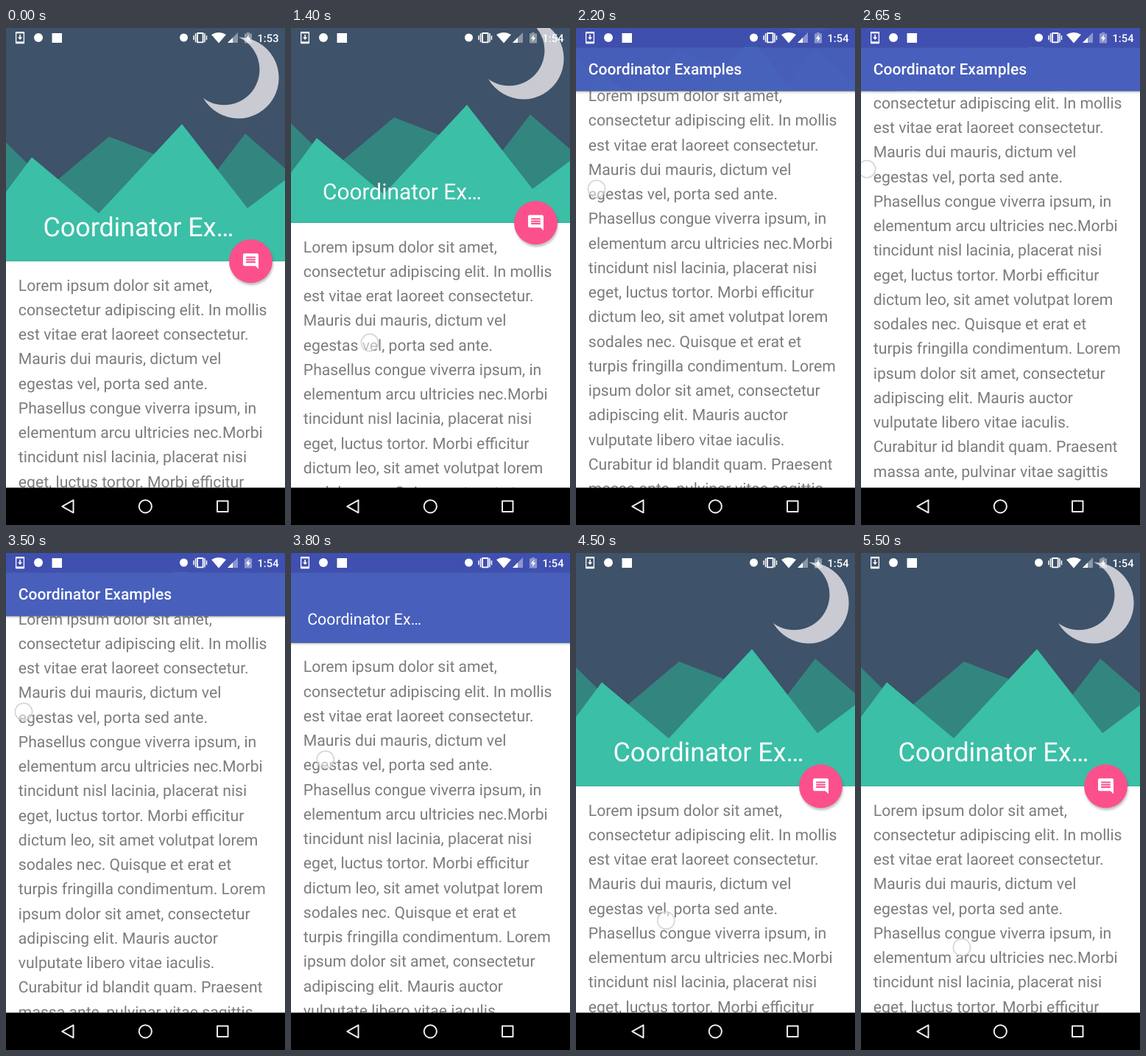
These frames come from a looping animation (379 by 673 pixels, 5.65 s). An HTML page with a canvas:

```html
<!DOCTYPE html>
<html lang="en">
<head>
<meta charset="utf-8">
<title>Collapsing toolbar</title>
<style>
  html, body { margin: 0; width: 100%; height: 100%; overflow: hidden; background: #000; }
  canvas { display: block; width: 379px; height: 673px; }
</style>
</head>
<body>
<canvas id="stage"></canvas>
<script>
const W = 379, H = 673, LOOP = 5650, STEP = 50, DP = W / 360;
const EXPANDED = 300 * DP, COLLAPSED = 81 * DP, RANGE = EXPANDED - COLLAPSED, NAV_TOP = H - 48 * DP;
const STATUS = 25 * DP;
const CLOCK_TICK = 800, SCRIM_IN = 1750, SCRIM_OUT = 3860, SCRIM_MS = 600, FAB_MS = 200;

const LINES = [
  'Lorem ipsum dolor sit amet,',
  'consectetur adipiscing elit. In mollis',
  'est vitae erat laoreet consectetur.',
  'Mauris dui mauris, dictum vel',
  'egestas vel, porta sed ante.',
  'Phasellus congue viverra ipsum, in',
  'elementum arcu ultricies nec.Morbi',
  'tincidunt nisl lacinia, placerat nisi',
  'eget, luctus tortor. Morbi efficitur',
  'dictum leo, sit amet volutpat lorem',
  'sodales nec. Quisque et erat et',
  'turpis fringilla condimentum. Lorem',
  'ipsum dolor sit amet, consectetur',
  'adipiscing elit. Mauris auctor',
  'vulputate libero vitae iaculis.',
  'Curabitur id blandit quam. Praesent',
  'massa ante, pulvinar vitae sagittis'
];

// time, finger x, finger y, scroll offset
const DRAG_UP = [
  [1200, 117, 478, 0], [1400, 107, 426, 52], [1800, 65, 283, 196],
  [2050, 38, 232, 244], [2650, 8, 191, 280], [2750, 7, 189, 282]
];
const DRAG_DOWN = [
  [3200, 8, 192, 282], [3500, 24, 215, 259], [3880, 54, 303, 171], [4100, 79, 394, 80],
  [4370, 113, 474, 0], [4700, 131, 520, 0], [5300, 137, 534, 0]
];

const BACK_HILLS = [[0, 155], [60, 214], [140, 147], [220, 178], [275, 208], [325, 143], [379, 190], [379, 317], [0, 317]];
const FRONT_HILLS = [[0, 222], [35, 175], [126, 251], [239, 130], [328, 244], [379, 206], [379, 317], [0, 317]];
const MOON = new Path2D('M268 95A55 55 0 1 0 316 12.5A48 48 0 1 1 268 95Z');
const COMMENT = new Path2D('M22 4c0-1.1-.9-2-2-2H4c-1.1 0-2 .9-2 2v12c0 1.1.9 2 2 2h14l4 4z' +
  'M18 14H6v-2h12zM18 11H6V9h12zM18 8H6V6h12z');

const canvas = document.getElementById('stage');
const ctx = canvas.getContext('2d');
const ratio = window.devicePixelRatio || 1;
canvas.width = Math.round(W * ratio);
canvas.height = Math.round(H * ratio);
ctx.textRendering = 'geometricPrecision';

const clamp = (v, lo = 0, hi = 1) => Math.min(hi, Math.max(lo, v));
const lerp = (a, b, p) => a + (b - a) * p;

// cubic-bezier(.4, 0, .2, 1)
function fastOutSlowIn(x) {
  let lo = 0, hi = 1, s = 0.5;
  for (let i = 0; i < 18; i++) {
    s = (lo + hi) / 2;
    const bx = 1.2 * s * (1 - s) ** 2 + 0.6 * s * s * (1 - s) + s ** 3;
    if (bx < x) lo = s; else hi = s;
  }
  return 3 * s * s * (1 - s) + s ** 3;
}

// Monotone cubic interpolation of one column of a key list
function sample(keys, column, t) {
  const last = keys.length - 1;
  if (t <= keys[0][0]) return keys[0][column];
  if (t >= keys[last][0]) return keys[last][column];
  const rate = i => (keys[i + 1][column] - keys[i][column]) / (keys[i + 1][0] - keys[i][0]);
  const slope = i => {
    if (i === 0) return rate(0);
    if (i === last) return 0;
    const a = rate(i - 1), b = rate(i);
    return a * b > 0 ? 2 * a * b / (a + b) : 0;
  };
  const i = keys.findIndex((k, n) => t < keys[n + 1][0]);
  const dt = keys[i + 1][0] - keys[i][0], u = (t - keys[i][0]) / dt;
  return keys[i][column] * (1 + 2 * u) * (1 - u) ** 2 + slope(i) * dt * u * (1 - u) ** 2 +
    keys[i + 1][column] * u * u * (3 - 2 * u) + slope(i + 1) * dt * u * u * (u - 1);
}

// 1 while the header is reduced to a toolbar, eased at both ends
function collapsedAmount(t, duration) {
  return fastOutSlowIn(clamp((t - SCRIM_IN) / duration)) -
    fastOutSlowIn(clamp((t - SCRIM_OUT) / duration));
}

function rect(color, x, y, w, h) {
  ctx.fillStyle = color;
  ctx.fillRect(x, y, w, h);
}

function polygon(points) {
  ctx.beginPath();
  points.forEach(([x, y]) => ctx.lineTo(x, y));
  ctx.closePath();
}

function fillPolygon(color, points) {
  ctx.fillStyle = color;
  polygon(points);
  ctx.fill();
}

function circle(x, y, r) {
  ctx.beginPath();
  ctx.arc(x, y, r, 0, 2 * Math.PI);
}

function text(string, x, y, size, color, weight = 400) {
  ctx.font = `${weight} ${size}px Roboto, sans-serif`;
  ctx.fillStyle = color;
  ctx.fillText(string, x, y);
}

function drawBody(offset) {
  rect('#fff', 0, 0, W, H);
  LINES.forEach((line, i) => text(line, 16 * DP, 355.6 - offset + i * 33.25, 21.17, '#7c7c7c'));
}

function drawHeader(offset, height, scrim) {
  ctx.save();
  ctx.beginPath();
  ctx.rect(0, 0, W, height);
  ctx.clip();
  rect('#3e5269', 0, 0, W, H);
  ctx.translate(0, -Math.min(offset, RANGE) / 2);
  ctx.fillStyle = '#c9cad2';
  ctx.fill(MOON);
  fillPolygon('#338580', BACK_HILLS);
  fillPolygon('#3bbfa7', FRONT_HILLS);
  // the hills run on below the picture while it slides at half speed
  ctx.restore();

  ctx.globalAlpha = scrim;
  rect('#485fbc', 0, STATUS, W, height - STATUS);
  rect('#4050b0', 0, 0, W, STATUS);
  const shadow = ctx.createLinearGradient(0, height, 0, height + 4);
  shadow.addColorStop(0, 'rgba(0,0,0,.22)');
  shadow.addColorStop(1, 'rgba(0,0,0,0)');
  rect(shadow, 0, height, W, 4);
  ctx.globalAlpha = 1;
}

function drawTitle(offset) {
  const p = clamp(offset / RANGE);
  const size = lerp(34, 20, 1 - (1 - p) ** 2) * DP;
  const full = p === 1;
  text(full ? 'Coordinator Examples' : 'Coordinator Ex…',
    lerp(48, 16, p) * DP, lerp(281.8, 63, p), size, '#fff', full ? 500 : 400);
}

function drawFab(y, shown) {
  if (shown <= 0.01) return;
  ctx.save();
  ctx.translate(332.5, y);
  ctx.scale(shown, shown);
  ctx.globalAlpha = shown;
  ctx.save();
  ctx.shadowColor = 'rgba(0,0,0,.24)';
  ctx.shadowBlur = 3 * ratio;
  ctx.shadowOffsetX = ratio;
  ctx.shadowOffsetY = 3 * ratio;
  ctx.fillStyle = '#fc508c';
  circle(0, 0, 28 * DP);
  ctx.fill();
  ctx.restore();
  ctx.scale(DP, DP);
  ctx.translate(-12, -12);
  ctx.fillStyle = '#fff';
  ctx.fill(COMMENT, 'evenodd');
  ctx.restore();
}

function drawStatusBar(t) {
  const white = '#fff', dim = 'rgba(255,255,255,.4)';
  ctx.strokeStyle = white;
  ctx.lineWidth = 1.3;
  ctx.strokeRect(13.6, 5.6, 10.8, 15);
  rect(white, 13, 5, 12, 2.4);
  rect(white, 13, 18.4, 12, 2.6);
  rect(white, 18.3, 9, 1.6, 4);
  fillPolygon(white, [[16, 12.5], [22.2, 12.5], [19.1, 16]]);

  ctx.fillStyle = white;
  circle(44, 13, 6);
  ctx.fill();
  rect(white, 62.5, 7, 13.5, 13);
  ctx.fillStyle = white;
  circle(241.5, 13, 5.5);
  ctx.fill();

  ctx.lineWidth = 1.8;
  ctx.strokeRect(260, 7, 7.6, 12.4);
  [[254.3, 3], [256.8, 6], [269.2, 6], [271.7, 3]].forEach(([x, half]) =>
    rect(white, x, 13.2 - half, 1.5, half * 2));

  ctx.fillStyle = white;
  ctx.beginPath();
  ctx.moveTo(289, 20.5);
  ctx.lineTo(279, 9);
  ctx.quadraticCurveTo(289, 3, 299, 9);
  ctx.fill();

  fillPolygon(dim, [[301, 20], [315, 20], [315, 6]]);
  fillPolygon(white, [[301, 20], [308, 20], [308, 13]]);

  rect(dim, 324, 7.5, 10, 13);
  rect(dim, 327, 6, 4, 1.5);
  fillPolygon(white, [[330, 9], [325.8, 14.5], [328.5, 14.5], [328, 18.5], [332.2, 13], [329.5, 13]]);

  text(t < CLOCK_TICK ? '1:53' : '1:54', 341.5, 19, 14 * DP, white, 500);
}

function drawNavBar() {
  rect('#000', 0, NAV_TOP, W, H - NAV_TOP);
  ctx.strokeStyle = '#eee';
  ctx.lineWidth = 2;
  ctx.lineJoin = 'round';
  polygon([[76.3, 647.8], [91.5, 639.3], [91.5, 656.3]]);
  ctx.stroke();
  circle(189.3, 647.8, 8.6);
  ctx.stroke();
  ctx.strokeRect(287, 640.6, 14.5, 14.5);
}

function drawTouch(x, y) {
  circle(x, y, 11.6);
  ctx.fillStyle = 'rgba(255,255,255,.5)';
  ctx.fill();
  ctx.strokeStyle = 'rgba(195,195,200,.7)';
  ctx.lineWidth = 1.7;
  ctx.stroke();
}

function draw(t) {
  const keys = t < 3200 ? DRAG_UP : DRAG_DOWN;
  const touching = t >= 3200 || (t >= 1200 && t < 2750);
  const offset = sample(keys, 3, t);
  const height = Math.max(COLLAPSED, EXPANDED - offset);

  ctx.setTransform(ratio, 0, 0, ratio, 0, 0);
  drawBody(offset);
  drawHeader(offset, height, collapsedAmount(t, SCRIM_MS));
  drawTitle(offset);
  drawFab(height, 1 - collapsedAmount(t, FAB_MS));
  drawStatusBar(t);
  drawNavBar();
  if (touching) drawTouch(sample(keys, 1, t), sample(keys, 2, t));
}

const start = performance.now();
function frame(now) {
  const t = Math.max(0, now - start) % LOOP;
  draw(Math.floor(t / STEP) * STEP);
  requestAnimationFrame(frame);
}
draw(0);
requestAnimationFrame(frame);
</script>
</body>
</html>
```
